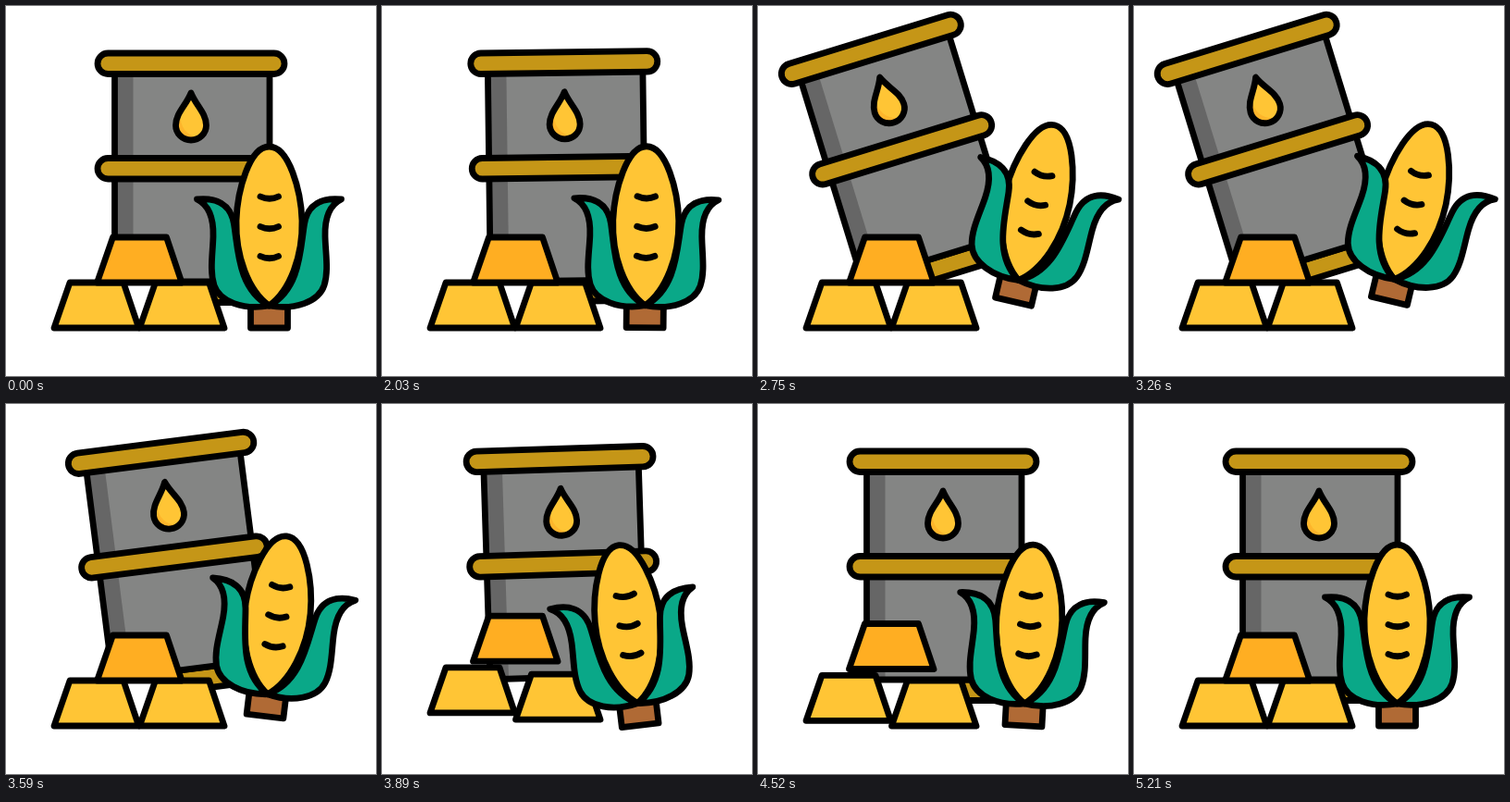
These frames come from a looping animation (400 by 400 pixels, 5240 ms). An HTML page:

```html
<!DOCTYPE html>
<html lang="en">
<head>
<meta charset="utf-8">
<title>Commodities</title>
<style>
  html, body { margin: 0; width: 100%; height: 100%; overflow: hidden; background: #fff; }
  svg { display: block; width: 100%; height: 100%; }
  .ink { stroke: #000; stroke-width: 6.8; stroke-linejoin: round; stroke-linecap: round; }
  .rim { fill: #c59617; }
  .gold { fill: #ffc535; }
  .leaf { fill: #0aa888; }
</style>
</head>
<body>
<svg viewBox="0 0 400 400">
  <defs>
    <path id="bar" d="M17 0H75L91.500 49H0Z"/>
    <path id="drop" d="M200 94C195 107 183.500 116 183.500 129A16.500 16 0 0 0 216.500 129C216.500 116 205 107 200 94Z"/>
    <path id="leaf" d="M206.500 209C219 215 224.500 230 224 249C223.500 268 220 286 225 302C231 320 257 329 284.500 324C251 306 251 264 246.500 236C243 213 226 207 206.500 209Z"/>
  </defs>

  <g id="barrel">
    <rect class="ink rim" x="166" y="298" width="112" height="22.500"/>
    <rect x="117.500" y="62" width="167.500" height="236" fill="#848584"/>
    <rect x="118" y="62" width="19.500" height="236" fill="#666"/>
    <rect class="ink" x="117.500" y="62" width="167.500" height="236" fill="none"/>
    <rect class="ink rim" x="99" y="51" width="202" height="22.500" rx="11.250"/>
    <rect class="ink rim" x="99" y="164.500" width="202" height="22.500" rx="11.250"/>
    <use href="#drop" class="gold"/>
    <path fill="#fdb52b" d="M188 116C188 131 195 140 208 142A16.500 16 0 0 1 183.500 129Z"/>
    <use href="#drop" class="ink" fill="none"/>
  </g>

  <g id="left"><use href="#bar" x="52" y="299" class="ink gold"/></g>
  <g id="right"><use href="#bar" x="144.500" y="299" class="ink gold"/></g>
  <g id="top"><use href="#bar" x="98.500" y="250" class="ink" fill="#ffae22"/></g>

  <g id="corn">
    <rect class="ink" x="264.500" y="320" width="40" height="28" fill="#b06a35"/>
    <path class="ink gold" d="M284.500 324C262 308 248 270 249 232C250 200 263 152 284.500 152C306 152 319 200 320 232C321 270 307 308 284.500 324Z"/>
    <path class="ink" fill="none" d="M275 206q10 4.500 19.500 0M275 238.500q10 4.500 19.500 0M275 270.500q10 4.500 19.500 0"/>
    <g id="leaves">
      <use href="#leaf" class="ink leaf"/>
      <use href="#leaf" class="ink leaf" transform="translate(569 0) scale(-1 1)"/>
    </g>
  </g>
</svg>
<script>
const LOOP = 5240, START = 2030, STEP = 30;
const RISE = 2015, PEAK = 3075, LAND = 3690, REST = 5190;

const span = (t, from, to) => Math.min(1, Math.max(0, (t - from) / (to - from)));
const move = (id, value) => document.getElementById(id).setAttribute("transform", value);

// Eases out to 1 at PEAK, then falls faster and faster to 0 at LAND
const push = (t, power) => t < PEAK
  ? 1 - (1 - span(t, RISE, PEAK)) ** 3
  : 1 - span(t, PEAK, LAND) ** power;

function drawBarrel(t) {
  const bounce = span(t, LAND, 4080);
  const angle = -17.6 * push(t, 3) - 7.2 * bounce * (1 - bounce);
  move("barrel", `rotate(${angle} 110 313)`);
}

// The thud lifts the bars; each next one flies lower and lands sooner
function drawBars(t) {
  ["top", "left", "right"].forEach((id, i) => {
    const u = span(t, LAND, 4600 - 40 * i);
    const arc = u < 1 ? Math.sin(Math.PI * u) ** 0.6 : 0;
    move(id, `translate(0 ${(9.3 * i - 27.3) * arc})`);
  });
}

// Pushed aside and lifted, then one slowing, fading sway
function drawCorn(t) {
  const p = push(t, 4), u = span(t, LAND, REST);
  const sway = -7.7 * (1 - u) ** 0.9 * Math.sin(2 * Math.PI * u ** 0.7);
  const angle = 13.5 * p + sway;
  const x = 17 * p + 2.7 * sway, y = -26.5 * p ** 1.5;
  move("corn", `translate(${x} ${y}) rotate(${angle} 285 238)`);
  move("leaves", `rotate(${0.3 * angle} 284.5 324)`);
}

const origin = performance.now();
function tick() {
  const now = (performance.now() - origin) % LOOP;
  const t = now < START ? 0 : START + Math.floor((now - START) / STEP) * STEP;
  drawBarrel(t);
  drawBars(t);
  drawCorn(t);
  requestAnimationFrame(tick);
}
tick();
</script>
</body>
</html>
```
